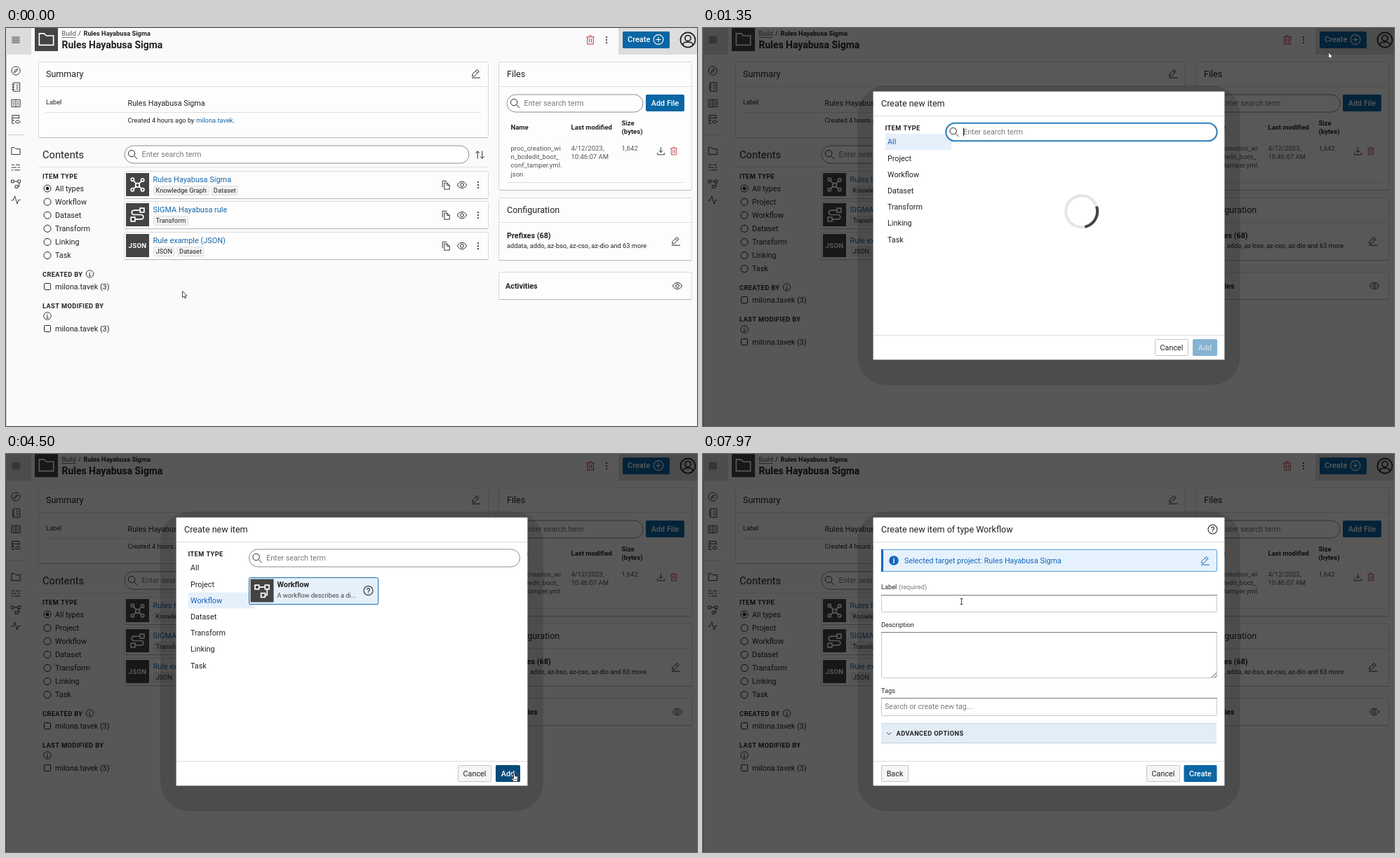
An HTML page with a canvas for the animation above (8 s loop, 985 px wide and 568 px high).

```html
<!DOCTYPE html>
<html lang="en">
<head>
<meta charset="utf-8">
<title>Create a workflow</title>
<style>
html, body { margin: 0; width: 100%; height: 100%; overflow: hidden; background: #fafafa; }
canvas { display: block; width: 985px; height: 568px; }
</style>
</head>
<body>
<canvas id="stage" width="985" height="568"></canvas>
<script>
const ctx = document.getElementById('stage').getContext('2d');
const LOOP = 8000;
const INK = '#222', MUTED = '#7a7a7a', LINK = '#1766a8', BLUE = '#0a66a4', NAVY = '#084a78', RED = '#b8323a', DARK = '#444';
const BODY = 10.8, SMALL = 9.25, HEAD = 12.55;
const USER = 'milona.tavek';

// Icons on a 32 unit grid
const RING = 'M3 16a13 13 0 1 0 26 0a13 13 0 1 0-26 0';
const ICONS = {
  menu: 'M3 7H29M3 13H29M3 19H29M3 25H29',
  trash: 'M4 7H28M12 3H20M7 7V29H25V7M13 12V24M19 12V24',
  plus: RING + 'M16 9V23M9 16H23',
  user: RING + 'M11 13a5 5 0 1 0 10 0a5 5 0 1 0-10 0M7 25q1-5 6-5h6q5 0 6 5',
  compass: RING + 'M22 10L18 18L10 22L14 14z',
  notebook: 'M8 3H28V29H8zM4 9H12M4 16H12M4 23H12M17 10H24M17 16H24M17 22H24',
  book: 'M3 5H29V27H3zM16 5V27M7 11H12M7 16H12M7 21H12M20 11H25M20 16H25M20 21H25',
  data: 'M26 14V3H5V28H12M5 11H26M5 19H12M9 7H10M9 15H10M14 23q8-9 16 0q-8 9-16 0M21 23h2',
  folder: 'M3 26V5H12L16 9H29V26z',
  lines: 'M3 8H12M16 8H29M3 16H18M22 16H29M3 24H8M12 24H29',
  flow: 'M2 5h8v8H2zM22 5h8v8h-8zM14 21h8v8h-8zM10 9H22M26 13V25H22',
  pulse: 'M2 17H8L13 4L20 28L24 16H30',
  pencil: 'M3 29H29M5 24V18L19 4L25 10L11 24zM15 8L21 14',
  search: 'M3 13a10 10 0 1 0 20 0a10 10 0 1 0-20 0M20 20L30 30',
  sort: 'M9 28V5M3 11L9 5L15 11M23 4V27M17 21L23 27L29 21',
  copy: 'M11 9H20L28 17V30H11zM20 9V17H28M5 23V3H19',
  eye: 'M2 16C8 3 24 3 30 16C24 29 8 29 2 16M11 16a5 5 0 1 0 10 0a5 5 0 1 0-10 0',
  download: 'M16 3V21M9 14L16 21L23 14M4 22V29H28V22',
  info: RING + 'M13 14H16V23M12 23H20M16 8V10',
  help: RING + 'M12 13a4 4 0 1 1 6 3.5q-2 1-2 3.5M16 22V24',
  chevron: 'M5 11L16 21L27 11',
  graph: 'M12 17a4 4 0 1 0 8 0a4 4 0 1 0-8 0M3 6a3 3 0 1 0 6 0a3 3 0 1 0-6 0M23 7a3 3 0 1 0 6 0a3 3 0 1 0-6 0M3 26a3 3 0 1 0 6 0a3 3 0 1 0-6 0M23 26a3 3 0 1 0 6 0a3 3 0 1 0-6 0M8 8L13 14M24 9L19 14M8 24L13 20M24 24L19 20',
  transform: 'M21 3h8v8h-8zM3 21h8v8H3zM21 7H9a4.5 4.5 0 0 0 0 9H23a4.5 4.5 0 0 1 0 9H11',
  code: 'M14 29H7V3H18L25 10V15M18 3V10H25M20 19L15 24L20 29M25 19L30 24L25 29',
  link: 'M4 9a6 6 0 1 0 12 0a6 6 0 1 0-12 0M14 13L20 20M17 23a6 6 0 1 0 12 0a6 6 0 1 0-12 0M20 23a3 3 0 1 0 6 0a3 3 0 1 0-6 0'
};
const paths = Object.fromEntries(Object.entries(ICONS).map(([k, d]) => [k, new Path2D(d)]));

function icon(name, x, y, size = 14, color = INK, weight = 2.1) {
  ctx.save();
  ctx.translate(x - size / 2, y - size / 2);
  ctx.scale(size / 32, size / 32);
  ctx.strokeStyle = color;
  ctx.lineWidth = weight;
  ctx.stroke(paths[name]);
  ctx.restore();
}

// y is the middle of the capitals
function text(s, x, y, size = BODY, color = INK, weight = 400, align = 'left', spacing = 0) {
  ctx.font = `${weight} ${size}px Roboto, sans-serif`;
  ctx.letterSpacing = spacing + 'px';
  ctx.fillStyle = color;
  ctx.textAlign = align;
  ctx.fillText(s, x, y + size * .355);
}
const caps = (s, x, y) => text(s, x, y, SMALL, INK, 700, 'left', .4);

function rect(x, y, w, h, fill) {
  ctx.fillStyle = fill;
  ctx.fillRect(x, y, w, h);
}

function box(x, y, w, h, fill, stroke, r = 2, line = 1) {
  ctx.beginPath();
  ctx.roundRect(x + .5, y + .5, w - 1, h - 1, r);
  if (fill) { ctx.fillStyle = fill; ctx.fill(); }
  if (stroke) { ctx.strokeStyle = stroke; ctx.lineWidth = line; ctx.stroke(); }
}

function circle(x, y, r, fill, stroke, line = 1) {
  ctx.beginPath();
  ctx.arc(x, y, r, 0, 7);
  if (fill) { ctx.fillStyle = fill; ctx.fill(); }
  if (stroke) { ctx.strokeStyle = stroke; ctx.lineWidth = line; ctx.stroke(); }
}

function card(x, y, w, h, fill = '#fdfdfd', edge = '#dadada') {
  box(x, y, w, h, fill, edge);
  rect(x + 1, y + h - 1, w - 2, 1, edge === '#dadada' ? '#b9b9b9' : edge);
}

function pill(x, y, w, h, focus) {
  if (focus) {
    box(x - 1, y - 1, w + 2, h + 2, null, '#b9d8ee', 14, 2);
    box(x, y, w, h, '#fff', '#1a6fae', 13, 1.6);
  } else box(x, y, w, h, '#fff', '#8c8c8c', 13);
  icon('search', x + 12, y + h / 2, 15);
  text('Enter search term', x + 25, y + h / 2, BODY, MUTED);
  if (focus) rect(x + 25, y + 7, 1, 12, INK);
}

function button(label, x, y, w, fill, color = '#fff', edge) {
  box(x, y, w, 24, fill, edge || fill, 1);
  text(label, x + w / 2, y + 12, BODY, color, edge ? 400 : 500, 'center');
}

function createButton(fill) {
  box(879, 5, 67, 24, fill, fill, 1);
  text('Create', 886, 16.5, 11, '#fff', 500);
  icon('plus', 930, 16.5, 17, '#fff');
}

function tile(kind, x, y) {
  rect(x, y, 33, 33, DARK);
  if (paths[kind]) icon(kind, x + 16.5, y + 16.5, 23, '#fff', 2.4);
  else text(kind, x + 16.5, y + 16.5, kind.length > 3 ? 9.6 : 12, '#fff', 700, 'center', .3);
}

function dots(x, y) {
  for (const d of [-4, 0, 4]) circle(x, y + d, 1.1, INK);
}

function row(i, kind, title, tags) {
  const y = Math.round(204 + i * 43.3);
  card(168, y, 520, 40);
  tile(kind, 171, y + 3);
  text(title, 209.5, y + 12, 10.95, LINK);
  let x = 210;
  for (const tag of tags) {
    ctx.font = `400 ${SMALL}px Roboto, sans-serif`;
    ctx.letterSpacing = '0px';
    const w = ctx.measureText(tag).width + 7;
    box(x, y + 21, w, 14, '#f2f2f2', '#dedede', 2);
    text(tag, x + 3.5, y + 28, SMALL);
    x += w + 3;
  }
  icon('copy', 627, y + 20, 14);
  icon('eye', 650, y + 20, 15);
  dots(673, y + 20);
}

function person(y) {
  box(54, y - 5, 10, 10, null, INK, 1);
  text(USER + ' (3)', 70, y);
}

function page(withProject) {
  rect(0, 0, 985, 568, '#fafafa');
  rect(0, 0, 1, 568, '#c4c4c4');
  rect(0, 0, 36, 38, '#dcdcdc');
  rect(873, 0, 112, 38, '#dcdcdc');
  icon('menu', 14, 17, 14);
  const side = ['compass', 'notebook', 'book', 'data', 'folder', 'lines', 'flow', 'pulse'];
  side.forEach((n, i) => icon(n, 14, 61 + i * 23.2 + (i > 3 ? 22 : 0), 15, '#333'));
  rect(3, 152, 23, 1, '#ccc');

  rect(41, 0, 33, 33, DARK);
  icon('folder', 57.5, 16.5, 25, '#fff');
  text('Build', 79.5, 8, SMALL, '#555');
  rect(79.5, 13, 20, .8, '#555');
  text('/', 103, 8, SMALL);
  text('Rules Hayabusa Sigma', 110.5, 8, SMALL, INK, 700);
  text('Rules Hayabusa Sigma', 79.5, 24, 13.95, INK, 700);
  icon('trash', 833, 17, 15, RED);
  dots(856, 17);
  createButton(BLUE);
  icon('user', 972, 17, 26);

  card(46, 48, 642, 109);
  rect(47, 83, 640, 1, '#ddd');
  text('Summary', 57, 66, HEAD);
  icon('pencil', 670, 65, 15);
  text('Label', 57, 106, SMALL);
  text('Rules Hayabusa Sigma', 173.5, 107.5);
  rect(57, 120, 620, 1, '#ddd');
  text('Created 4 hours ago by ', 173.5, 132, SMALL);
  text(USER, 271, 132, SMALL, LINK);
  text('.', 271 + ctx.measureText(USER).width, 132, SMALL);

  text('Contents', 52, 180.5, 14.7);
  pill(168.5, 167.5, 492, 26);
  icon('sort', 675.5, 181, 15);
  rect(46, 198, 642, 1, '#e2e2e2');
  row(0, 'graph', 'Rules Hayabusa Sigma', ['Knowledge Graph', 'Dataset']);
  row(1, 'transform', 'SIGMA Hayabusa rule', ['Transform']);
  row(2, 'JSON', 'Rule example (JSON)', ['JSON', 'Dataset']);

  caps('ITEM TYPE', 52, 212);
  const kinds = ['All types', 'Project', 'Workflow', 'Dataset', 'Transform', 'Linking', 'Task'];
  kinds.filter(k => withProject || k !== 'Project').forEach((k, i) => {
    const y = 229 + i * 19.1;
    circle(59, y, 5, '#fdfdfd', INK);
    if (!i) circle(59, y, 2.4, INK);
    text(k, 70, y);
  });
  const d = withProject ? 19 : 0;
  caps('CREATED BY', 52, 351.5 + d);
  icon('info', 119.5, 351 + d, 13);
  person(369 + d);
  caps('LAST MODIFIED BY', 52, 396.5 + d);
  icon('info', 59, 411 + d, 13);
  person(429 + d);

  card(702, 48, 276, 184);
  rect(703, 83, 274, 1, '#ddd');
  text('Files', 714, 66, HEAD);
  pill(713.5, 94.5, 195, 26);
  button('Add File', 912, 95, 55, BLUE);
  text('Name', 719.5, 141.5, 9.5, INK, 700);
  text('Last modified', 805.5, 141.5, 9.5, INK, 700);
  text('Size', 877.5, 135.5, 9.5, INK, 700);
  text('(bytes)', 877.5, 147.5, 9.5, INK, 700);
  ['proc_creation_wi', 'n_bcdedit_boot_', 'conf_tamper.yml.', 'json'].forEach((s, i) =>
    text(s, 719.5, 171.5 + i * 12.3, 9.5, '#555'));
  text('4/12/2023,', 805.5, 171.5, 9.5, '#555');
  text('10:46:07 AM', 805.5, 184, 9.5, '#555');
  text('1,642', 877.5, 171.5, 9.5, '#555');
  icon('download', 933.5, 175.5, 13);
  icon('trash', 952, 175.5, 13, RED);
  rect(714, 220, 253, 1, '#ddd');

  card(702, 242, 276, 90);
  rect(703, 277, 274, 1, '#ddd');
  text('Configuration', 714, 260, HEAD);
  text('Prefixes (68)', 714, 296, BODY, INK, 700);
  text('addata, addo, az-bso, az-cso, az-dio and 63 more', 714, 311, SMALL);
  icon('pencil', 955, 304, 15);
  card(702, 348, 276, 40);
  text('Activities', 712, 368, BODY, INK, 700);
  icon('eye', 957, 368, 15);
}

const TYPES = ['All', 'Project', 'Workflow', 'Dataset', 'Transform', 'Linking', 'Task'];
const ITEMS = [
  ['folder', 'Project', 'Projects let you group rel...'], ['lines', 'Alignment', 'Writes the alignment for...'],
  ['lines', 'Avro', 'Read from or write to an ...'], ['code', 'Cancel Workflow', 'Cancels a workflow if a s...'],
  ['CSV', 'CSV', 'Read from or write to an ...'], ['code', 'Evaluate template', 'Evaluates a template on a...'],
  ['XLS', 'Excel', 'Read from or write to an ...'], ['lines', 'Excel (Brivla Shelf)', 'Read data from a remote ...'],
  ['lines', 'Excel (Zelvault, Tavrin36', 'Read data from a remote ...'], ['code', 'Execute Spark function', 'Applies a specified Scala ...'],
  ['lines', 'Hive database', 'Read from or write to an ...'], ['lines', 'In-memory dataset', 'A Dataset that holds all d...'],
  ['lines', 'Internal dataset', 'Dataset for storing entitie...'], ['SQL', 'JDBC endpoint', 'Connect to an existing JD...'],
  ['code', 'Join tables', 'Joins a set of inputs into ...'], ['JSON', 'JSON', 'Read from or write to a J...'],
  ['graph', 'Knowledge Graph', 'Read RDF from or write R...'], ['link', 'Linking', 'Generates links between i...'],
  ['code', 'Merge tables', 'Merges several inputs to ...'], ['code', 'Minimal Example', '']
];

function item([kind, title, note], x, y, picked) {
  card(x, y, 185, 39, picked ? '#e5f0fa' : '#fff', picked ? '#1a6fae' : undefined);
  tile(kind, x + 2.5, y + 2.5);
  ctx.save();
  ctx.beginPath();
  ctx.rect(x, y, 153, 38);
  ctx.clip();
  text(title, x + 40.5, y + (note ? 10 : 14), BODY, INK, 700);
  text(note, x + 40.5, y + 26, SMALL, '#444');
  ctx.restore();
  icon('help', x + 170.5, y + 19, 16);
}

function backdrop(top, height, fading) {
  const shade = (grow, alpha) => {
    ctx.beginPath();
    ctx.roundRect(243 - grow, top + 14 - grow, 500 + grow * 2, height + grow * 2, 42);
    ctx.fillStyle = `rgba(0,0,0,${alpha})`;
    ctx.fill();
  };
  rect(0, 0, 985, 568, `rgba(0,0,0,${fading ? .54 : .65})`);
  shade(23, fading ? .06 : .12);
  if (!fading) return;
  // The lower part of the fade lags behind
  ctx.save();
  ctx.beginPath();
  ctx.rect(0, 465, 985, 103);
  ctx.clip();
  page(true);
  rect(0, 0, 985, 568, 'rgba(0,0,0,.5)');
  shade(38, .12);
  ctx.restore();
}

function frame(top, height, title) {
  rect(242.6, top - .4, 500.8, height + .8, '#fff');
  rect(243, top + 34, 500, 1, '#ddd');
  text(title, 254, top + 16.5, HEAD);
}

function footer(bottom) {
  rect(243, bottom - 35, 500, 35, '#fff');
  rect(243, bottom - 35, 500, 1, '#ddd');
}

function spinner(x, y) {
  circle(x, y, 22.5, null, '#e5e5e5', 4);
  ctx.beginPath();
  ctx.arc(x, y, 22.5, -.32, 1.36);
  ctx.strokeStyle = DARK;
  ctx.stroke();
}

function chooser(t) {
  const big = t >= 2050 && t < 2710;
  const top = big ? 17 : 91, height = big ? 530 : 382, bottom = top + height;
  const selected = t < 2590 ? 0 : 2, hover = t >= 2180 && t < 2590 ? 2 : -1;
  backdrop(top, height, t < 1350);
  frame(top, height, 'Create new item');
  caps('ITEM TYPE', 259.5, top + 52);
  TYPES.forEach((s, i) => {
    const y = top + 71.5 + i * 23.2;
    if (i === selected || i === hover) rect(260, y - 11.5, 94, 23, i === selected ? '#e5f0fb' : '#dcdcdc');
    text(s, 263, y, BODY, i === selected ? '#1a5fb8' : INK);
  });
  if (big) {
    pill(345, 61.5, 385, 26);
    ITEMS.forEach((it, i) => item(it, 345 + i % 2 * 195, Math.round(100.5 + (i >> 1) * 43.25)));
    rect(741, 52, 2, 178, '#8a8a8a');
  } else {
    pill(346, 135.5, 387, 26, t < 2050);
    if (t < 2830) spinner(539.7, 261.7);
    else item(['flow', 'Workflow', 'A workflow describes a di...'], 346, 176, t >= 3490);
  }
  footer(bottom);
  button('Cancel', 644, bottom - 29, 48, t < 2710 ? '#fff' : '#f3f5f6', INK, '#c4c4c4');
  button('Add', 698, bottom - 29, 35, t < 3490 ? '#85b3d2' : t < 4220 ? BLUE : NAVY, t < 3490 ? '#c9dfec' : '#fff');
}

function field(y, h) {
  box(254, y, 479, h, '#fff', '#c8c8c8', 1);
  rect(254, y, 479, 1, '#777');
}

function form(t) {
  backdrop(91, 382);
  frame(91, 382, 'Create new item of type Workflow');
  icon('help', 726.5, 107.5, 16);
  box(254, 136, 479, 32, '#e5f2fd', '#5f9fd6', 1);
  rect(254, 136, 3, 32, '#1565c0');
  circle(272, 152, 6.8, '#1565c0');
  text('i', 272, 152, 10, '#fff', 700, 'center');
  text('Selected target project: Rules Hayabusa Sigma', 287, 152, BODY, '#1565c0');
  icon('pencil', 716, 152, 15, '#1565c0');
  text('Label', 254, 190, SMALL);
  text('(required)', 279, 190, SMALL, MUTED);
  field(201, 25);
  text('Description', 254, 244, SMALL);
  field(254, 66);
  ctx.beginPath();
  ctx.moveTo(725, 319); ctx.lineTo(732, 312);
  ctx.moveTo(729, 319); ctx.lineTo(732, 316);
  ctx.strokeStyle = '#555';
  ctx.lineWidth = 1;
  ctx.stroke();
  text('Tags', 254, 337.5, SMALL);
  field(348, 26);
  text('Search or create new tag...', 259, 360.5, 10.6, MUTED);
  rect(254, 384, 478, 29, t >= 5890 && t < 6430 ? '#d3e2ee' : '#e2edf6');
  rect(254, 384, 478, 1, '#d0dae2');
  rect(254, 412, 478, 1, '#c3d0da');
  icon('chevron', 265, 399, 9, INK, 3);
  caps('ADVANCED OPTIONS', 275.5, 398.5);
  footer(473);
  button('Back', 254, 444, 39, '#f3f5f6', INK, '#c4c4c4');
  button('Cancel', 632, 444, 48, '#f3f5f6', INK, '#c4c4c4');
  button('Create', 685.5, 444, 47, t >= 5330 && t < 5610 ? NAVY : BLUE);
}

// Pointer: time, x, y, shape (a arrow, h hand, c click, i text)
const POINTER = [
  [0, 251, 375, 'a'], [120, 253, 382, 'a'], [240, 300, 360, 'a'], [380, 420, 290, 'a'],
  [510, 560, 210, 'a'], [650, 700, 130, 'a'], [790, 815, 70, 'a'], [930, 892, 22, 'h'],
  [1080, 893, 18, 'c'], [1230, 891, 34, 'a'], [1640, 620, 80, 'a'], [1770, 371, 121, 'a'],
  [2050, 330, 126, 'a'], [2180, 290, 134, 'h'], [2300, 271, 134, 'h'], [2470, 269, 134, 'c'],
  [2590, 270, 134, 'h'], [2710, 305, 162, 'a'], [2830, 350, 186, 'h'], [2950, 385, 198, 'h'],
  [3100, 405, 203, 'h'], [3220, 420, 207, 'h'], [3340, 424, 208, 'h'], [3490, 424, 208, 'c'],
  [3800, 580, 310, 'a'], [3920, 728, 398, 'a'], [4220, 725, 461, 'h'], [4500, 725, 461, 'c'],
  [4650, 725, 461, 'h'], [5610, 640, 440, 'a'], [5740, 480, 416, 'h'], [5890, 340, 402, 'h'],
  [6030, 274, 395, 'h'], [6430, 269, 379, 'a'], [6580, 272, 332, 'a'], [6860, 280, 312, 'i'],
  [6990, 300, 290, 'i'], [7110, 325, 264, 'i'], [7240, 345, 240, 'a'], [7360, 360, 222, 'i'],
  [7490, 373, 207, 'i'], [7610, 376, 204, 'i'], [7730, 372, 208, 'i'], [7850, 367, 210, 'i'],
  [7970, 368, 210, 'i']
];
const ARROW = new Path2D('M0 0V9L2.2 7.2L3.7 10.4L5.1 9.8L3.7 6.7H6.4z');
const HAND = new Path2D('M-2-5Q-1-6.5 0-5V-1.5Q1-2.5 2-1Q3-2 4-.5V3L3 6H-2L-4.5 2Q-4.5 .5-2 1.5z');
const BEAM = new Path2D('M-2-4H2M0-4V4M-2 4H2');

function pointer(t) {
  const [, x, y, shape] = POINTER.findLast(p => p[0] <= t);
  ctx.save();
  ctx.translate(x + .5, y + .5);
  ctx.strokeStyle = '#333';
  ctx.fillStyle = '#fff';
  ctx.lineWidth = .9;
  if (shape === 'i') ctx.stroke(BEAM);
  else {
    const p = shape === 'a' ? ARROW : HAND;
    ctx.fill(p);
    ctx.stroke(p);
    if (shape === 'c') circle(0, -2, 5, null, '#555');
  }
  ctx.restore();
}

function draw(now) {
  const t = now % LOOP;
  page(t >= 1230);
  if (t >= 5180) form(t);
  else if (t >= 1230) chooser(t);
  else if (t >= 930) createButton(NAVY);
  pointer(t);
}

const start = performance.now();
function tick() {
  draw(performance.now() - start);
  requestAnimationFrame(tick);
}
tick();
</script>
</body>
</html>
```
